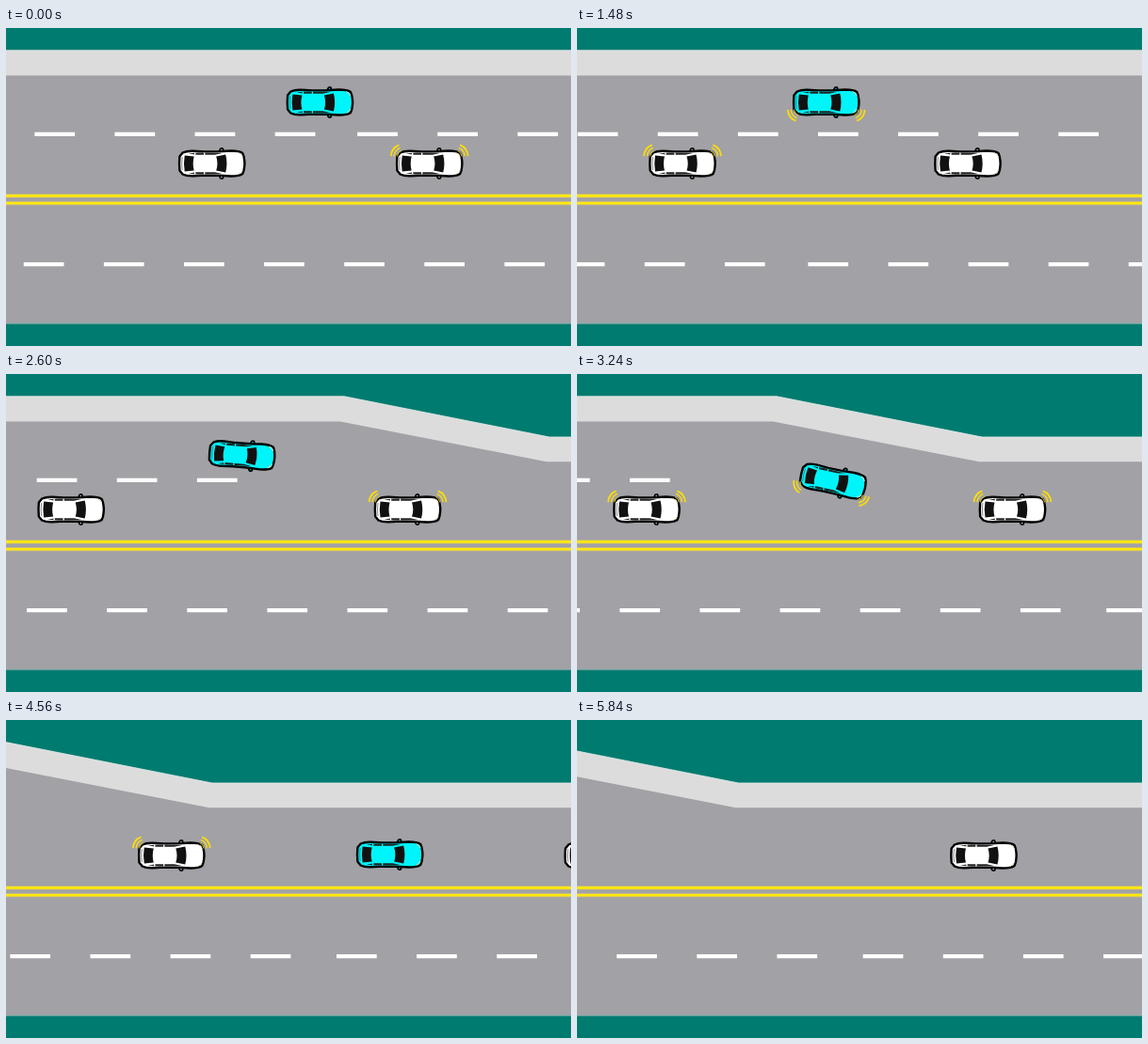
These frames come from a looping animation (600x338 px, 5880 ms). An HTML page:

```html
<!DOCTYPE html>
<html lang="en">
<head>
<meta charset="utf-8">
<title>Lane merge</title>
<style>
html, body { margin: 0; width: 100%; height: 100%; overflow: hidden; background: #007b6f; }
svg { display: block; width: 100vw; height: 100vh; }
</style>
</head>
<body>
<svg viewBox="0 0 600 338" preserveAspectRatio="none">
  <defs>
    <g id="car">
      <path id="mirror" d="M7.500 -12.500 L9 -15.500 Q10.500 -16.500 11.700 -15.500 L12 -12.500 Z" fill="currentColor" stroke="#000" stroke-width="1.800"/>
      <use href="#mirror" transform="scale(1 -1)"/>
      <path d="M-34.300 -7.500 L-31 -11.500 Q-27 -13.400 -20 -13.200 L-8 -12.600 L8 -12.800 L20 -13.500 Q29 -13.500 32.500 -11 Q34.500 -7 34.700 0 Q34.500 7 32.500 11 Q29 13.500 20 13.500 L8 12.800 L-8 12.600 L-20 13.200 Q-27 13.400 -31 11.500 L-34.300 7.500 Q-35 0 -34.300 -7.500 Z"
        fill="currentColor" stroke="#000" stroke-width="2.400" stroke-linejoin="round"/>
      <path d="M-31.500 -7 Q-32.500 0 -31.500 7" fill="none" stroke="#555" stroke-width=".7"/>
      <path d="M-29 -8.500 L-19 -7.500 Q-21 0 -19 7.500 L-29 8.500 Q-30.500 0 -29 -8.500 Z" fill="#111"/>
      <path d="M4.500 -7.500 L14.500 -9.500 Q17 0 14.500 9.500 L4.500 7.500 Q7 0 4.500 -7.500 Z" fill="#111"/>
      <path id="glass" d="M-25 -10.700 L-17 -9.200 L3 -9.200 L11 -11 L-14 -11.400 Z" fill="#222"/>
      <use href="#glass" transform="scale(1 -1)"/>
      <path d="M-8 -11.500 V-9 M-18 -11.500 V-9 M-8 11.500 V9 M-18 11.500 V9" stroke="currentColor" stroke-width="1.300"/>
      <path d="M28 -11.300 Q31.500 -10.500 32.500 -7 M28 11.300 Q31.500 10.500 32.500 7" fill="none" stroke="#e5d6b8" stroke-width="1"/>
    </g>
    <g id="arcs" fill="none" stroke="#fbdc0c" stroke-width="1.800">
      <path id="arc" d="M4.800 -12.500 A13.400 13.400 0 0 1 13.400 -.7"/>
      <use href="#arc" transform="scale(.75)"/>
      <use href="#arc" transform="scale(.5)"/>
    </g>
    <g id="waves">
      <use href="#arcs" transform="translate(27.500 -7.200)"/>
      <use href="#arcs" transform="translate(-27.500 -7.200) scale(-1 1)"/>
    </g>
  </defs>
  <rect width="600" height="338" fill="#007b6f"/>
  <rect y="120" width="600" height="193.700" fill="#a2a1a6"/>
  <rect y="313.500" width="600" height="1" fill="#b9bdbf"/>
  <g id="road">
    <path d="M-10 23.800 H1125 L1343 67 H1800 V110 H-10 Z" fill="#dcdcdc" stroke="#e8eceb" stroke-width=".8"/>
    <path d="M-10 50.500 H1121 L1340 93.200 H1800 V150 H-10 Z" fill="#a2a1a6"/>
    <path id="dashes" fill="#fff"/>
  </g>
  <g fill="none">
    <path id="center" d="M0 178.400 H600 M0 186.200 H600" stroke="#c6bd80" stroke-width="4.200"/>
    <path d="M0 178.400 H600 M0 186.200 H600" stroke="#ffe80c" stroke-width="2.600"/>
  </g>
  <g id="follower" color="#fff"><use href="#car"/><use class="signal" href="#waves"/></g>
  <g id="leader" color="#fff"><use href="#car"/><use class="signal" href="#waves"/></g>
  <g id="merger" color="#00f5fa"><use href="#car"/><use class="signal" href="#waves" transform="scale(1 -1)"/></g>
</svg>
<script>
const LOOP = 5880, STEP = 40, BLINK = 600;
const byId = id => document.getElementById(id);

// Lane marks: [first x, count, y]
const PITCH = 85.1;
const runs = [[30.4, 4, 110.8], [373.2, 8, 110.8], [18.8, 8, 248.9], [703, 9, 248.9], [1475.1, 5, 248.9]];
byId('dashes').setAttribute('d', runs.map(([x, count, y]) =>
  Array.from({ length: count }, (_, i) => `M${x + i * PITCH} ${y} h42.700 v4.300 h-42.700 Z`).join('')).join(''));

// Camera path: [time, road offset]
const camera = [[0, 0], [840, -262], [1480, -457.6], [2600, -766], [3240, -912.9], [4560, -1124.1], [5840, -1171.4]];
const secant = i => (camera[i + 1][1] - camera[i][1]) / (camera[i + 1][0] - camera[i][0]);
const slopes = camera.map(([t], i) => {
  if (i === 0) return secant(0);
  if (i === camera.length - 1) return 0;
  const before = t - camera[i - 1][0], after = camera[i + 1][0] - t;
  return (secant(i - 1) * after + secant(i) * before) / (before + after);
});

function cameraAt(t) {
  let i = 0;
  while (i < camera.length - 2 && t >= camera[i + 1][0]) i++;
  const [t0, p0] = camera[i], [t1, p1] = camera[i + 1];
  const span = t1 - t0, u = (t - t0) / span, v = 1 - u;
  return p0 + (p1 - p0) * u * u * (3 - 2 * u) + span * u * v * (slopes[i] * v - slopes[i + 1] * u);
}

// Each car keeps a constant road speed
const cars = [
  { id: 'follower', x: 218.7, speed: 0.2371, on: 240, until: 5400 },
  { id: 'leader', x: 449.7, speed: 0.2857, on: 0, until: LOOP },
  { id: 'merger', x: 333.4, speed: 0.2628, on: 240, until: 4200 }
].map(car => {
  const node = byId(car.id);
  return { ...car, node, signal: node.querySelector('.signal') };
});

function merge(t) {
  const u = Math.min(1, Math.max(0, (t - 2180) / 2000));
  return { y: 79 + 64 * u * u * (3 - 2 * u), angle: 12.5 * Math.sin(Math.PI * u) ** 2 };
}

function draw(t) {
  const offset = cameraAt(t), phase = t % BLINK;
  byId('road').setAttribute('transform', `translate(${offset} 0)`);
  for (const car of cars) {
    const { y, angle } = car.id === 'merger' ? merge(t) : { y: 144, angle: 0 };
    const x = car.x + car.speed * t + offset;
    car.node.setAttribute('transform', `translate(${x} ${y}) rotate(${angle})`);
    const lit = t < car.until && phase >= car.on && phase < car.on + 280;
    car.signal.setAttribute('visibility', lit ? 'visible' : 'hidden');
  }
}

const start = performance.now();
function tick() {
  const t = (performance.now() - start) % LOOP;
  draw(Math.floor(t / STEP) * STEP);
  requestAnimationFrame(tick);
}
tick();
</script>
</body>
</html>
```
